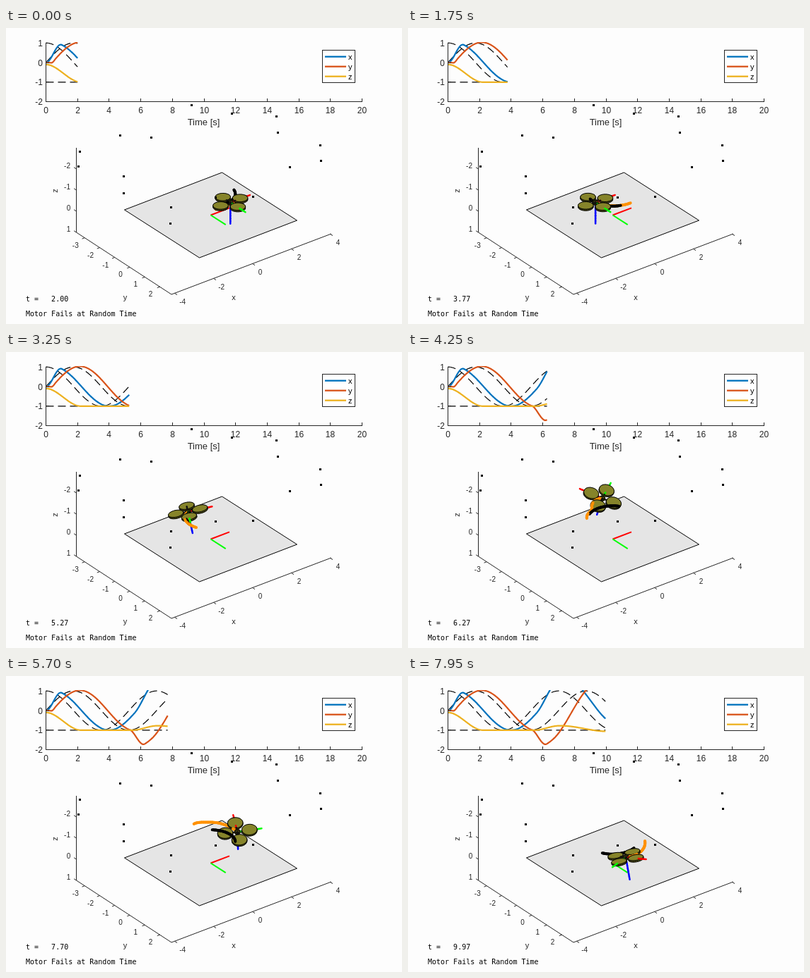
Write an HTML page with a canvas that moves like this. It is 560 by 420 pixels and loops after 8000 ms.

```html
<!DOCTYPE html>
<html lang="en">
<head>
<meta charset="utf-8">
<title>Quadrotor motor failure</title>
<style>
  html, body { margin: 0; width: 100%; height: 100%; overflow: hidden; background: #fdfdfd; }
  canvas { display: block; width: 560px; height: 420px; }
</style>
</head>
<body>
<canvas id="stage" width="560" height="420"></canvas>
<script>
const ctx = document.getElementById('stage').getContext('2d');
const LOOP = 8000, STEP = 50, TRAIL = 33, TRAIL_STEP = .05;
const SANS = '"Liberation Sans", Arial, sans-serif';
const MONO = '"DejaVu Sans Mono", monospace';
const INK = '#262626';
const COLORS = { x: '#0072bd', y: '#d95319', z: '#edb120' };

// Eased ramp from 0 at time a to 1 at time b.
function ramp(t, a, b) {
  const u = Math.min(Math.max((t - a) / (b - a), 0), 1);
  return u * u * (3 - 2 * u);
}

// The planned path is a circle; the flown one lags it and drifts off after the failure.
const TURN = 2 * Math.PI / 7;
const planned = { x: t => Math.cos(TURN * t), y: t => Math.sin(TURN * t), z: () => -1 };
const flown = {
  x: t => ramp(t, 0, 1) * planned.x(t - .5)
    + .62 * ramp(t, 5.6, 6.9) * (1 - .7 * ramp(t, 7.2, 10)),
  y: t => 1.03 * ramp(t, .2, .6) * planned.y(t - .4)
    - .82 * ramp(t, 5.3, 6.25) + 1.5 * ramp(t, 6.7, 10.3),
  z: t => -.1 - .9 * ramp(t, 0, 2.2) + .22 * ramp(t, 5.5, 7) - .28 * ramp(t, 7.2, 10)
};
const at = (path, t) => [path.x(t), path.y(t), path.z(t)];

// Key attitudes: time, yaw in degrees, lean of the body's z axis along x and y.
const attitudes = [
  [4.9, 0, 0, 0], [5.27, 32, .12, .15], [6.27, 237, 0, -.36],
  [7.7, 658, .18, -.19], [8.7, 863, -.04, .16], [9.97, 1151, .05, .2]
];
function attitude(t) {
  const last = attitudes.length - 1;
  let i = 0;
  while (i < last - 1 && t > attitudes[i + 1][0]) i++;
  const [a, b] = [attitudes[i], attitudes[i + 1]];
  const before = attitudes[Math.max(i - 1, 0)], after = attitudes[Math.min(i + 2, last)];
  const h = b[0] - a[0], u = Math.min(Math.max((t - a[0]) / h, 0), 1), w = 1 - u;
  return [1, 2, 3].map(k => {
    const enter = (b[k] - before[k]) / (b[0] - before[0]);
    const leave = (after[k] - a[k]) / (after[0] - a[0]);
    return a[k] * w * w * (1 + 2 * u) + b[k] * u * u * (3 - 2 * u) + h * u * w * (enter * w - leave * u);
  });
}

// Orthographic view: screen position plus closeness to the viewer.
const view = ([x, y, z]) => [289.5 + 27.6 * x + 21.2 * y, 265.5 - 10.6 * x + 13.6 * y + 30 * z];
const nearness = ([x, y, z]) => -.53 * x + .69 * y - .5 * z;

function stroke(points, color, width, dash = []) {
  ctx.beginPath();
  points.forEach(p => ctx.lineTo(p[0], p[1]));
  ctx.strokeStyle = color;
  ctx.lineWidth = width;
  ctx.setLineDash(dash);
  ctx.stroke();
  ctx.setLineDash([]);
}
function fill(points, color) {
  ctx.beginPath();
  points.forEach(p => ctx.lineTo(p[0], p[1]));
  ctx.closePath();
  ctx.fillStyle = color;
  ctx.fill();
  ctx.strokeStyle = '#000';
  ctx.lineWidth = 1;
  ctx.stroke();
}
function text(string, x, y, size, align = 'center', family = SANS, color = INK) {
  ctx.font = `${size}px ${family}`;
  ctx.textAlign = align;
  ctx.fillStyle = color;
  ctx.fillText(string, x, y);
}

const plotX = t => 56.5 + 22.35 * t, plotY = v => 49 - 27.8 * v;
const crisp = v => Math.round(v - .5) + .5;

function drawPlot(now) {
  ctx.save();
  ctx.beginPath();
  ctx.rect(56, 20, 448, 85);
  ctx.clip();
  const trace = fn => Array.from({ length: Math.round(now * 30) + 1 },
    (_, i) => [plotX(i / 30), plotY(fn(i / 30))]);
  for (const k in planned) stroke(trace(planned[k]), '#000', 1.2, [11, 6]);
  for (const k in flown) stroke(trace(flown[k]), COLORS[k], 2.2);
  ctx.restore();

  stroke([[56.5, 21], [56.5, 104.5], [504, 104.5]], INK, 1);
  for (let t = 0; t <= 20; t += 2) {
    const x = crisp(plotX(t));
    stroke([[x, 104.5], [x, 100]], INK, 1);
    text(t, x, 121, 12);
  }
  for (let v = -2; v <= 1; v++) {
    const y = crisp(plotY(v));
    stroke([[56.5, y], [61, y]], INK, 1);
    text(v, 52, y + 4.5, 12, 'right');
  }
  text('Time [s]', 279.5, 138, 13);

  ctx.fillStyle = '#fff';
  ctx.fillRect(447.5, 31.5, 46, 46);
  ctx.strokeStyle = INK;
  ctx.strokeRect(447.5, 31.5, 46, 46);
  Object.keys(COLORS).forEach((k, i) => {
    const y = 40.7 + 14 * i;
    stroke([[451, y], [481, y]], COLORS[k], 2.3);
    text(k, 484, y + 3.8, 11, 'left', SANS, '#000');
  });
}

function drawRoom() {
  fill([[-2.5, -2.5, 0], [2.5, -2.5, 0], [2.5, 2.5, 0], [-2.5, 2.5, 0]].map(view), '#e5e5e5');
  stroke([[99.5, 170], [99.5, 290], [234, 378], [460, 292]], INK, 1);

  const tick = (x, y, dx, dy, label, lx, ly) => {
    stroke([[x, y], [x + dx, y + dy]], INK, 1);
    text(label, x + lx, y + ly + 3.5, 10);
  };
  for (let v = -4; v <= 4; v += 2) tick(348.6 + 27.5 * v, 334.4 - 10.5 * v, 3.4, 2.2, v, 11, 12);
  for (let v = -3; v <= 2; v++) tick(175 + 21.25 * v, 339.4 + 13.9 * v, -3.7, 1.4, v, -13, 10.5);
  for (let v = -2; v <= 1; v++) tick(99.5, 260 + 30 * v, -3.4, -2.2, v, v < 0 ? -13 : -11, -4.5);
  text('x', 322, 386, 11);
  text('y', 168.5, 386, 11);
  ctx.save();
  ctx.translate(73, 231);
  ctx.rotate(-Math.PI / 2);
  text('z', 0, 0, 11);
  ctx.restore();

  stroke([[0, 0, 0], [.96, 0, 0]].map(view), '#f00', 2);
  stroke([[0, 0, 0], [0, 1, 0]].map(view), '#0f0', 2);
}

const markers = [[262, 109], [319, 121], [382, 125], [384, 148], [444, 166], [445, 188], [401, 197],
  [161, 152], [205, 155], [104, 175], [102, 196], [166, 210], [166, 234], [233, 254], [232, 277],
  [296, 240], [349, 239]];

// Body to world transform at a time.
function pose(t) {
  const origin = at(flown, t), [yaw, nx, ny] = attitude(t);
  const nz = Math.sqrt(1 - nx * nx - ny * ny), heading = yaw * Math.PI / 180;
  const spun = angle => {
    const c = Math.cos(angle), s = Math.sin(angle), k = (nx * c + ny * s) / (1 + nz);
    return [c - k * nx, s - k * ny, -k * (nz + 1)];
  };
  const ex = spun(heading), ey = spun(heading + Math.PI / 2), ez = [nx, ny, nz];
  return (x, y, z) => origin.map((o, i) => o + x * ex[i] + y * ey[i] + z * ez[i]);
}

function drawFlight(now) {
  const body = pose(now), hub = body(0, 0, 0), parts = [];
  const add = (p, draw, lift = 0) => parts.push({ depth: nearness(p) + lift, draw });
  const line = (a, b, color, width, pieces) => {
    const mix = u => a.map((v, i) => v + (b[i] - v) * u);
    for (let i = 0; i < pieces; i++) {
      const ends = [mix(i / pieces), mix((i + 1) / pieces)].map(view);
      add(mix((i + .5) / pieces), () => stroke(ends, color, width));
    }
  };
  const trail = (path, color) => {
    for (let i = TRAIL; i > 0; i--) {
      const t = now - i * TRAIL_STEP;
      line(at(path, t), at(path, t + TRAIL_STEP), color, 4, 1);
    }
  };
  const rotor = (x, y) => {
    const ring = z => Array.from({ length: 24 }, (_, i) => {
      const a = i * Math.PI / 12;
      return view(body(x + .31 * Math.cos(a), y + .31 * Math.sin(a), z));
    });
    line(hub, body(x, y, 0), '#111', 2.5, 2);
    add(body(x, y, 0), () => {
      const low = ring(.035), high = ring(-.035);
      fill(low, '#5d5b1a');
      low.forEach((p, i) => stroke([p, high[i]], '#15150a', .8));
      fill(high, '#86842a');
    }, .1);
  };

  ctx.lineCap = 'round';
  trail(flown, '#ff9100');
  trail(planned, '#000');
  line(hub, body(1, 0, 0), '#f00', 2.5, 8);
  line(hub, body(0, 1, 0), '#0f0', 2.5, 8);
  line(hub, body(0, 0, 1), '#00f', 2.5, 8);
  for (const side of [-.5, .5]) {
    rotor(side, 0);
    rotor(0, side);
  }
  add(hub, () => {
    const [x, y] = view(hub);
    ctx.beginPath();
    ctx.arc(x, y, 4.5, 0, 7);
    ctx.fillStyle = '#1b1a08';
    ctx.fill();
    stroke([[x - 2, y - 1], [x + 2, y - 1]], '#6f6d20', 1);
  }, .05);

  parts.sort((a, b) => a.depth - b.depth).forEach(p => p.draw());
  ctx.lineCap = 'butt';
}

function draw(ms) {
  const now = 2 + Math.ceil(Math.floor(ms % LOOP / STEP) * 1.5) / 30;
  ctx.fillStyle = '#fdfdfd';
  ctx.fillRect(0, 0, 560, 420);
  drawPlot(now);
  drawRoom();
  drawFlight(now);
  ctx.fillStyle = '#000';
  markers.forEach(([x, y]) => ctx.fillRect(x - 1, y - 1, 3, 3));
  text('t =   ' + now.toFixed(2), 28, 388, 10, 'left', MONO, '#000');
  text('Motor Fails at Random Time', 28, 409, 10, 'left', MONO, '#000');
}

let start;
function loop(time) {
  start ??= time;
  draw(time - start);
  requestAnimationFrame(loop);
}
draw(0);
requestAnimationFrame(loop);
</script>
</body>
</html>
```
